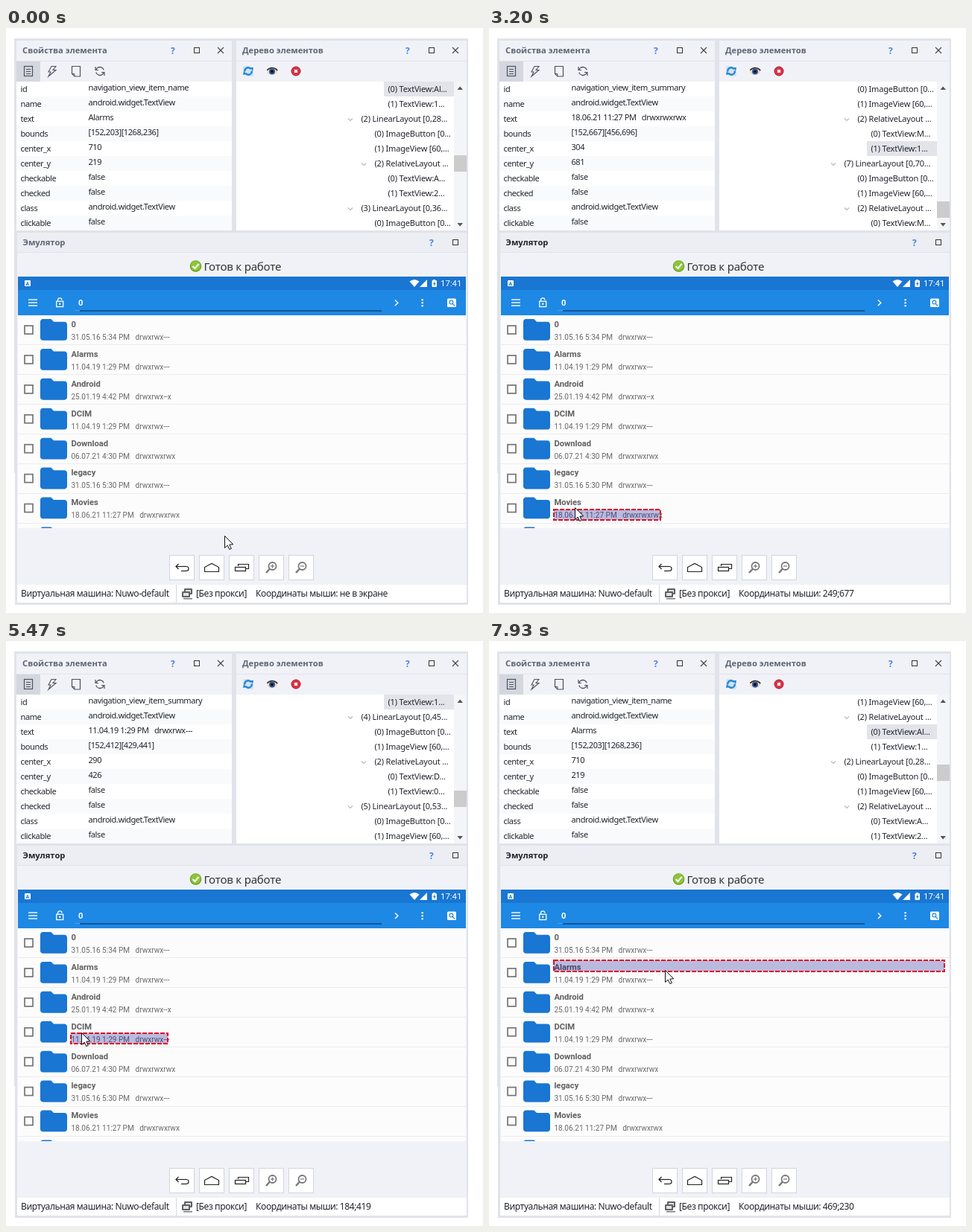
An HTML page with a canvas for the animation above (8 s loop, 640x786 px).

```html
<!DOCTYPE html>
<html lang="ru">
<head>
<meta charset="utf-8">
<title>Инспектор элементов</title>
<style>
html, body { margin: 0; width: 100%; height: 100%; overflow: hidden; background: #fff; }
canvas { display: block; }
</style>
</head>
<body>
<canvas id="stage" width="640" height="786"></canvas>
<script>
const g = document.getElementById('stage').getContext('2d');
const FRAMES = 120, STEP = 8000 / FRAMES;
const SCALE = 601 / 1280, LEFT = 16, TOP = 334, BOTTOM = 671;
const ROW = 85, FIRST = 110; // row pitch and list start in device pixels
const UI = '"Noto Sans", "Open Sans", sans-serif', DROID = 'Roboto, sans-serif';
const INK = '#22242e', GREY = '#5d6574', PANEL = '#f1f2f7', EDGE = '#e1e3ea', BLUE = '#1976d2';

const files = [
  ['0', '31.05.16 5:34 PM', 'drwxrwx---'],
  ['Alarms', '11.04.19 1:29 PM', 'drwxrwx---'],
  ['Android', '25.01.19 4:42 PM', 'drwxrwx--x'],
  ['DCIM', '11.04.19 1:29 PM', 'drwxrwx---'],
  ['Download', '06.07.21 4:30 PM', 'drwxrwxrwx'],
  ['legacy', '31.05.16 5:30 PM', 'drwxrwx---'],
  ['Movies', '18.06.21 11:27 PM', 'drwxrwxrwx'],
  ['Music', '11.04.19 1:29 PM', 'drwxrwx---']
];
const summary = f => f[1] + '   ' + f[2];

// pointer key points: time, x, y
const path = [
  [0, 293, 682], [530, 114, 645], [900, 114, 645], [1130, 300, 768], [1340, 300, 768],
  [1800, 114, 646], [2130, 188, 682], [2340, 188, 682], [2930, 133, 651.9], [3135, 133, 651.9],
  [3200, 114.5, 644], [3900, 85, 630], [3933, 81.7, 616.6], [4000, 83, 615], [4700, 110, 575],
  [4867, 110, 568.3], [4933, 113, 562], [5500, 100, 524], [5930, 57.8, 519.5], [6133, 57.8, 519.5],
  [6200, 60, 520], [7000, 62, 444], [7640, 86, 444], [7867, 236.2, 442]
];

function pointerAt(t) {
  const i = path.findIndex(p => p[0] >= t);
  if (i < 0) return path[path.length - 1].slice(1);
  if (i === 0) return path[0].slice(1);
  const [t0, x0, y0] = path[i - 1], [t1, x1, y1] = path[i];
  const p = (t - t0) / (t1 - t0);
  return [x0 + (x1 - x0) * p, y0 + (y1 - y0) * p];
}

// tree index (6 per file row) of the element under the pointer
function hit(t) {
  const [x, y] = pointerAt(t);
  if (t < 2340 || y > BOTTOM) return null;
  const dx = (x - LEFT) / SCALE, dy = (y - TOP) / SCALE - FIRST;
  const row = Math.floor(dy / ROW);
  const part = dx < 60 ? 1 : dx < 144 ? 2 : dx < 152 ? 3 : dy - row * ROW < 44 ? 4 : 5;
  return row * 6 + part;
}

// selection and tree scroll follow the hover, frame by frame
const states = [];
for (let n = 0, sel = 10, top = 10, props = 10; n < FRAMES; n++) {
  const hover = hit(n * STEP - 30);
  sel = hover ?? sel;
  props = hit(n * STEP - 45) ?? props;
  top = Math.max(sel - 9, Math.min(top, sel));
  states.push({ hover, sel, top, props });
}

function element(k) {
  const row = Math.floor(k / 6), f = files[row], y = FIRST + ROW * row;
  const dashes = f[2].split('-').length - 1;
  const right = 456 - 12 * (17 - f[1].length) - 5 * dashes;
  const make = (type, id, b, text) => ({ type, id: 'navigation_view_item' + id, b, text });
  return [
    make('LinearLayout', '', [0, y, 1280, y + 84]),
    make('ImageButton', '_check', [0, y, 60, y + 84]),
    make('ImageView', '_icon', [60, y, 144, y + 84]),
    make('RelativeLayout', '_text', [144, y, 1268, y + 84]),
    make('TextView', '_name', [152, y + 8, 1268, y + 41], f[0]),
    make('TextView', '_summary', [152, y + 47, right, y + 76], summary(f))
  ][k % 6];
}

function treeLabel(k) {
  const row = Math.floor(k / 6), f = files[row];
  const short = f[0].slice(0, /^(.l|l.)/.test(f[0]) ? 2 : 1);
  return [
    `(${row}) LinearLayout [0,${String(FIRST + ROW * row).slice(0, 2)}...`,
    '(0) ImageButton [0...', '(1) ImageView [60,...', '(2) RelativeLayout ...',
    `(0) TextView:${short}...`, `(1) TextView:${f[1][0]}...`
  ][k % 6];
}

function box(x, y, w, h, c) { g.fillStyle = c; g.fillRect(x, y, w, h); }
function frame(x, y, w, h, c, lw = 1) { g.strokeStyle = c; g.lineWidth = lw; g.strokeRect(x, y, w, h); }
function text(s, x, y, size, c = INK, o = {}) {
  g.font = `${o.w || 400} ${size}px ${o.f || UI}`;
  g.letterSpacing = (o.ls || 0) + 'px';
  g.fillStyle = c;
  g.fillText(s, x, y);
}
function trace(pts, closed) {
  g.beginPath();
  for (let i = 0; i < pts.length; i += 2) g.lineTo(pts[i], pts[i + 1]);
  if (closed) g.closePath();
}
function line(pts, c, lw = 1, closed) { trace(pts, closed); g.strokeStyle = c; g.lineWidth = lw; g.stroke(); }
function poly(pts, c) { trace(pts, true); g.fillStyle = c; g.fill(); }
function disc(x, y, r, c) { g.beginPath(); g.arc(x, y, r, 0, 7); g.fillStyle = c; g.fill(); }
function arc(x, y, r, c, lw = 1, a = 0, b = 2 * Math.PI) {
  g.beginPath(); g.arc(x, y, r, a, b); g.strokeStyle = c; g.lineWidth = lw; g.stroke();
}
function round(x, y, w, h, r, c) { g.beginPath(); g.roundRect(x, y, w, h, r); g.fillStyle = c; g.fill(); }

function header(title, x, y, help, close, color = GREY) {
  text(title, x, y + 4, 11.2, color, { w: 700 });
  text('?', help - 3, y + 4.5, 12, '#4383e6', { w: 700 });
  frame(help + 28.5, y - 3.5, 7, 7, '#333');
  if (!close) return;
  line([help + 60, y - 4, help + 68, y + 4], '#444', 1.1);
  line([help + 68, y - 4, help + 60, y + 4], '#444', 1.1);
}

function panels() {
  box(0, 0, 640, 786, '#fff');
  box(11, 14, 609, 584, EDGE);
  for (const [x, w] of [[14, 289], [309, 309]]) {
    box(x, 17, w, 255, PANEL);
    box(x, 44, w, 1, EDGE);
  }
  header('Свойства элемента', 22, 30, 224, true);
  header('Дерево элементов', 317, 30, 539, true);
  propertyTools();
  treeTools();
}

function propertyTools() {
  const c = '#4c5260';
  box(14, 45, 32, 27, '#d4d7df');
  frame(24.5, 51.5, 11, 13, c, 1.2);
  for (let y = 55.5; y < 62; y += 3) line([27, y, 33, y], c);
  line([61, 51.5, 67, 51.5, 63, 56.5, 67, 56.5, 57, 65, 60, 59, 57, 59], c, 1.1, true);
  line([88.5, 51.5, 99.5, 51.5, 99.5, 65, 92, 65, 88.5, 61.5], c, 1.2, true);
  line([88.5, 61.5, 92, 61.5, 92, 65], c);
  arc(126, 58, 5.5, c, 1.3, -2.9, -.3);
  arc(126, 58, 5.5, c, 1.3, .25, 2.85);
  line([120, 52, 120, 56.5, 124, 56.5], c, 1.2);
  line([132, 64, 132, 59.5, 128, 59.5], c, 1.2);
}

function treeTools() {
  const c = '#2c86d1';
  round(318, 51, 9, 11, 1, '#cfe4f7');
  round(323, 55, 9, 10, 1, '#cfe4f7');
  arc(325, 58, 4.8, c, 2.5, 3, 5.7);
  arc(325, 58, 4.8, c, 2.5, -.1, 2.5);
  poly([328, 53, 332, 53, 331, 58], c);
  poly([318, 63, 319, 58, 323, 62], c);
  g.beginPath(); g.ellipse(357, 59, 7, 4, 0, 0, 7); g.fillStyle = '#f2ddc0'; g.fill();
  disc(357, 58.5, 4, '#2d55a2');
  disc(357, 58.5, 2, '#111');
  arc(357, 62, 8.5, '#3b2a22', 1.7, 3.8, 5.7);
  disc(389, 58, 6.5, '#d9364a');
  arc(389, 58, 5.8, '#b8283a');
  box(387, 56, 4, 4, '#fff');
}

function properties(k) {
  const e = element(k), [x0, y0, x1, y1] = e.b, cls = 'android.widget.' + e.type;
  const rows = [['id', e.id], ['name', cls]];
  if (e.text) rows.push(['text', e.text]);
  rows.push(['bounds', `[${x0},${y0}][${x1},${y1}]`],
    ['center_x', Math.floor((x0 + x1) / 2)], ['center_y', Math.floor((y0 + y1) / 2)],
    ['checkable', 'false'], ['checked', 'false'], ['class', cls],
    ['clickable', 'false'], ['displayed', 'true']);
  box(14, 72, 289, 200, '#fff');
  rows.slice(0, 10).forEach(([name, value], i) => {
    const y = 72 + 20 * i;
    if (i % 2) box(14, y, 289, 20, '#f9fafc');
    text(name, 19.5, y + 14, 11, INK, { ls: -.4 });
    text(value, 110.5, y + 12, 11, INK, { ls: -.42 });
  });
}

function tree({ sel, top }, thumb) {
  box(309, 72, 292, 200, '#fff');
  for (let i = 0; i < 10; i++) {
    const k = top + i, j = k % 6, y = 72 + 20 * i;
    const x = j === 0 ? 477 : j < 4 ? 495 : 513;
    if (k === sel) box(x - 6, y, 607 - x, 20, '#e3e4ea');
    if (j % 3 === 0) line([x - 18, y + 9.5, x - 15, y + 12.5, x - 12, y + 9.5], '#b5b8c0', 1.1);
    text(treeLabel(k), x - .5, y + 14, 11, INK, { ls: -.18 });
  }
  box(601, 72, 17, 200, '#f4f5f8');
  poly([605.5, 83, 613, 83, 609.2, 78.5], '#555');
  poly([605.5, 262, 613, 262, 609.2, 266.5], '#555');
  box(601, Math.round(147.6 + 2.3 * thumb), 17, 22, '#cccccd');
}

const folderShape = new Path2D('M10 4H4C2.9 4 2 4.9 2 6V18C2 19.1 2.9 20 4 20H20C21.1 20 22 19.1 22 18V8C22 6.9 21.1 6 20 6H12Z');
function folder(x, y) {
  g.save();
  g.translate(x, y);
  g.scale(1.8, 1.8);
  g.translate(-12, -12);
  g.fillStyle = BLUE;
  g.fill(folderShape);
  g.restore();
}

function appBar() {
  const w = '#fff', bar = '#1e88e5';
  box(16, 334, 601, 18, BLUE);
  box(16, 352, 601, 34, bar);
  round(25, 339, 8, 8, 1, w);
  text('A', 26.6, 346, 7, BLUE, { w: 700, f: DROID });
  g.beginPath(); g.moveTo(548, 348); g.lineTo(541.5, 340.5);
  g.quadraticCurveTo(548, 335.5, 554.5, 340.5); g.fillStyle = w; g.fill();
  poly([555, 348, 565, 348, 565, 338], w);
  box(573, 338, 3, 2, w);
  round(571.5, 339, 6.5, 9, 1, w);
  poly([575.5, 340, 573, 344, 574.5, 344, 574, 347, 576.7, 343, 575, 343], BLUE);
  text('17:41', 583, 347, 11.4, w, { f: DROID });

  for (const dy of [-4, 0, 4]) {
    line([30, 369 + dy, 42, 369 + dy], w, 1.4);
    disc(558.7, 369.2 + dy, 1.25, w);
  }
  frame(67.7, 367.2, 9, 7.3, w, 1.3);
  arc(72.2, 365.5, 2.7, w, 1.2, Math.PI, 0);
  line([69.5, 365, 69.5, 367], w, 1.2);
  disc(72.2, 370.8, 1.2, w);
  text('0', 97, 373, 11.2, w, { w: 700, f: DROID });
  box(92, 379, 8, 1, '#4b9fe8');
  box(99, 379, 405, 2, '#125698');
  line([522, 365.5, 525.8, 369.2, 522, 373], w, 1.5);
  round(592, 363.5, 12, 11.5, 1.5, w);
  arc(597.4, 368.6, 2.4, bar, 1.2);
  line([599.2, 370.4, 602, 373.2], bar, 1.3);
}

function highlight(k) {
  const [x0, y0, x1, y1] = element(k).b;
  const x = Math.round(LEFT + x0 * SCALE), y = Math.round(TOP + y0 * SCALE);
  const w = Math.round((x1 - x0) * SCALE), h = Math.round((y1 - y0) * SCALE);
  box(x, y, w, h, 'rgba(0,0,139,.264)');
  g.setLineDash([6, 2]);
  frame(x, y, w, h, '#df0b25', 2);
  g.setLineDash([]);
}

function device(hover) {
  g.save();
  g.beginPath(); g.rect(LEFT, TOP, 601, 338); g.clip();
  box(LEFT, TOP, 601, 338, '#fcfcfc');
  appBar();
  files.forEach((f, i) => {
    const y = TOP + (FIRST + ROW * i) * SCALE;
    box(16, Math.round(y + 39.4), 601, 1, '#ececec');
    frame(25, y + 14.4, 11, 11, '#757575', 1.7);
    folder(64, y + 19.8);
    text(f[0], 87.4, y + 16.3, 11.2, '#5f5f5f', { w: 700, f: DROID });
    text(summary(f), 87.4, y + 33.3, 10.05, '#686868', { f: DROID });
  });
  if (hover !== null) highlight(hover);
  g.restore();
}

function zoom(x, plus) {
  const c = '#777';
  arc(x + 1.5, 723, 5, c, 1.8);
  line([x - 2, 726.5, x - 7, 732], c, 2.4);
  line([x - 1, 723, x + 4, 723], c, 1.2);
  if (plus) line([x + 1.5, 720.5, x + 1.5, 725.5], c, 1.2);
}

function buttons() {
  for (let x = 219; x < 400; x += 40) {
    box(x, 708, 34, 34, '#fff');
    frame(x + .5, 708.5, 33, 33, '#d2d5de');
  }
  const c = '#222';
  line([231.5, 720, 228, 723.5, 231.5, 727], c, 1.2);
  line([228, 723.5, 242, 723.5], c, 1.2);
  arc(242, 726.5, 3, c, 1.2, -Math.PI / 2, Math.PI / 2);
  line([242, 729.5, 235, 729.5], c, 1.2);
  line([266.5, 730.5, 266.5, 724.5, 276, 719.5, 285.5, 724.5, 285.5, 730.5], c, 1.2, true);
  line([311.5, 723, 311.5, 720.5, 325.5, 720.5, 325.5, 726.5, 322, 726.5], c, 1.2);
  frame(307.5, 724.5, 14, 5, c, 1.2);
  zoom(356, true);
  zoom(396, false);
}

function statusBar(coords) {
  const note = (s, x) => text(s, x, 764, 12, INK, { ls: -.4 });
  box(15, 748, 603, 24, '#fff');
  box(228, 748, 1, 24, '#d5d7de');
  for (const [x, y] of [[239, 753], [236, 757]]) {
    round(x, y, 11, 8, 1, '#606060');
    box(x + 2, y + 2, 7, 4, '#dfe2e7');
  }
  box(238, 766, 12, 1.5, '#777');
  note('Виртуальная машина: Nuwo-default', 20);
  note('[Без прокси]', 255);
  note('Координаты мыши: ' + coords, 335);
}

function emulator(active, hover, coords) {
  box(12, 272, 608, 503, EDGE);
  box(15, 275, 603, 473, PANEL);
  box(15, 275, 603, 26, '#eceef3');
  box(15, 301, 603, 1, EDGE);
  header('Эмулятор', 22.5, 288, 571, false, active ? '#20222c' : GREY);
  disc(254.5, 320, 7.8, '#6da323');
  disc(254.5, 319.5, 6.6, '#8cc63a');
  line([250.5, 320, 253.5, 323, 258.7, 316.8], '#fff', 2.1);
  text('Готов к работе', 265.5, 326, 15, '#333', { ls: -.25 });
  device(hover);
  buttons();
  statusBar(coords);
}

function pointer(x, y) {
  g.save();
  g.translate(Math.round(x) + .5, Math.round(y) + .5);
  const arrow = [0, 0, 0, 16, 3.7, 12.6, 6.2, 18, 8.8, 17, 6.3, 11.6, 11.3, 11.3];
  poly(arrow, '#fff');
  line(arrow, '#111', 1, true);
  g.restore();
}

function coordsAt(t) {
  const [x, y] = pointerAt(t);
  const tracked = t < 1130 || t > 2340;
  if (!tracked || y > BOTTOM) return 'не в экране';
  return Math.round((x - LEFT) / SCALE) + ';' + Math.round((y - TOP) / SCALE);
}

function draw(n) {
  const t = n * STEP, now = states[n];
  panels();
  properties(now.props);
  tree(states[Math.max(0, n - 3)], now.top);
  emulator(t > 930, now.hover, coordsAt(t - STEP));
  pointer(...pointerAt(t));
}

let start = null;
function tick(ms) {
  start ??= ms;
  draw(Math.floor((ms - start + 4) / STEP) % FRAMES);
  requestAnimationFrame(tick);
}
draw(0);
requestAnimationFrame(tick);
</script>
</body>
</html>
```
